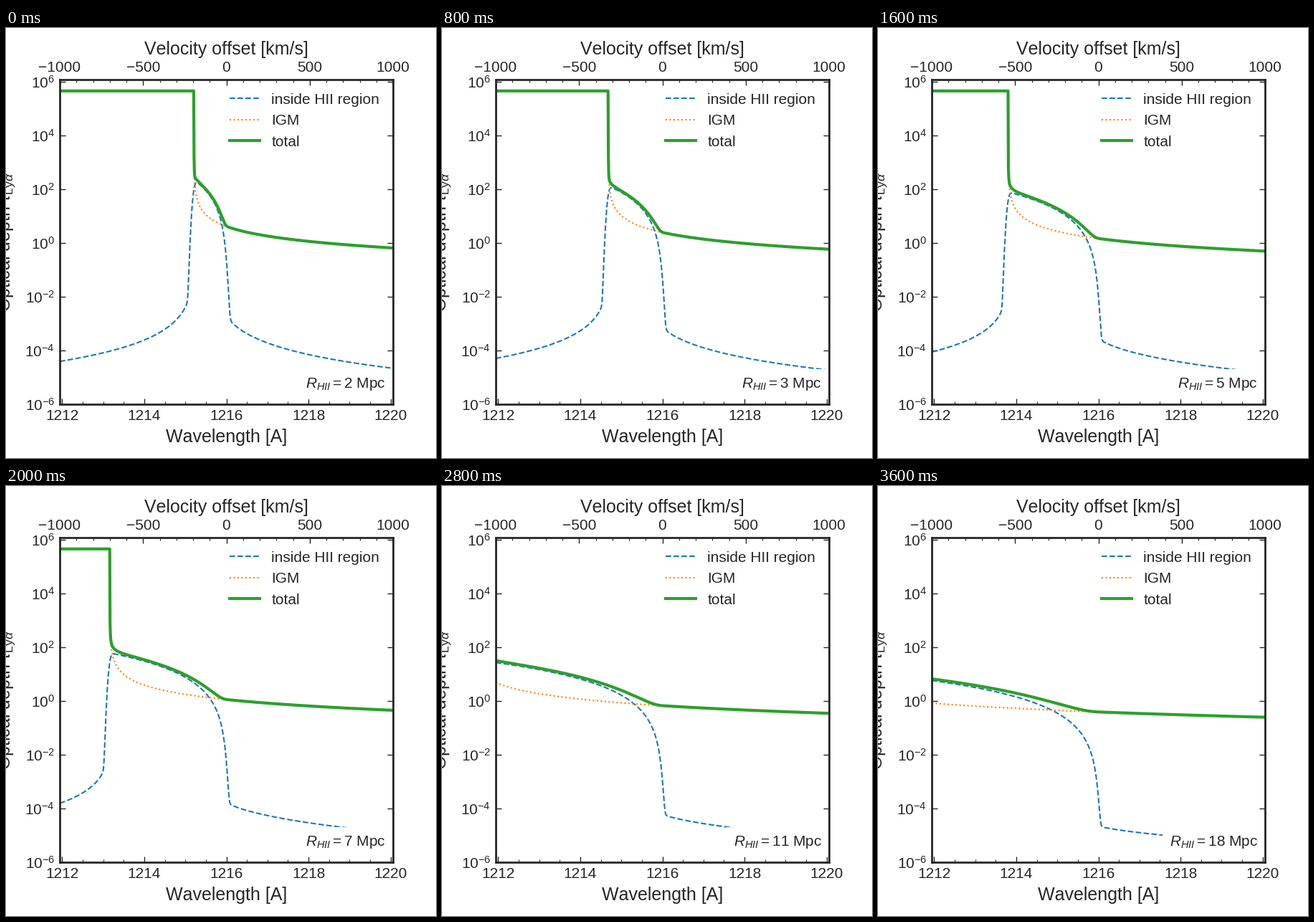
Animation of 600 by 600 pixels, one loop 4 s. Source, as a matplotlib script:

```python
import numpy as np
import matplotlib.pyplot as plt
from matplotlib.animation import FuncAnimation
from matplotlib.ticker import AutoMinorLocator, FixedLocator, MultipleLocator, NullLocator

INK = "#262626"
plt.rcParams.update({
    "font.family": "Liberation Sans",
    "font.size": 15,
    "text.kerning_factor": 6,
    "mathtext.fontset": "custom",
    "mathtext.rm": "Liberation Sans",
    "mathtext.it": "Liberation Sans:italic",
    "mathtext.fallback": "cm",
    "text.color": INK,
    "axes.edgecolor": INK,
    "axes.linewidth": 2,
    "xtick.color": INK,
    "ytick.color": INK,
})

C = 299792.458      # speed of light, km/s
LINE = 1216.0       # line centre, Angstrom
HUBBLE = 107.0      # km/s per Mpc
B = 12.85           # thermal width, km/s
WING = 2.0e-3       # damping wing strength, km/s
TAU_GP = 4.55e5     # depth of the neutral gas
RADII = np.logspace(0, 1, 10) * 20 / 11

v = np.linspace(-1000, 1000, 1001)
wave = LINE * (1 + v / C)


def igm_depth(radius):
    gap = v + HUBBLE * radius
    wing = 0.0027 * C / np.maximum(gap, 1e-3) - 0.026
    return np.where(gap > 0, np.minimum(wing, TAU_GP), TAU_GP)


def bubble_depth(radius, n=1500):
    """Residual neutral gas, growing as r^2, smeared by a Voigt profile."""
    r = (np.arange(n) + 0.5) * radius / n
    depth = 400 * r**2 / radius**3
    d2 = (v[:, None] + HUBBLE * r) ** 2
    core = np.exp(-d2 / B**2) / (np.sqrt(np.pi) * B)
    wing = WING / np.maximum(d2, (1.5 * B) ** 2)
    return (core + wing) @ depth * HUBBLE * radius / n


fig, ax = plt.subplots(figsize=(6, 6), dpi=100, facecolor="white")
fig.subplots_adjust(left=0.125, right=0.9, bottom=0.125, top=0.88)

ax.set_yscale("log")
ax.set_xlim(wave[0], wave[-1])
ax.set_ylim(1e-6, 1.2e6)
ax.xaxis.set_major_locator(MultipleLocator(2))
ax.xaxis.set_minor_locator(AutoMinorLocator(4))
ax.yaxis.set_major_locator(FixedLocator(10.0 ** np.arange(-6, 7, 2)))
ax.yaxis.set_minor_locator(NullLocator())

top = ax.twiny()
top.set_xlim(-1000, 1000)
top.xaxis.set_major_locator(MultipleLocator(500))
top.xaxis.set_minor_locator(AutoMinorLocator(5))
for side in top.spines.values():
    side.set_visible(False)

for a in (ax, top):
    a.tick_params(which="major", direction="in", length=6, width=1, pad=5)
    a.tick_params(which="minor", direction="in", length=3, width=0.8)
ax.tick_params(axis="y", right=True)


def label(x, y, text, **kw):
    fig.text(x / 600, 1 - y / 600, text, fontsize=18, ha="center",
             va="baseline", rotation_mode="anchor", **kw)


label(307.5, 37, "Velocity offset [km/s]")
label(307.5, 578, "Wavelength [A]")
label(6, 298.5, r"Optical depth $\tau_{\mathregular{Ly}\alpha}$", rotation=90)

inside, = ax.plot([], [], "--", color="#1f77b4", lw=1.5, label="inside HII region")
igm, = ax.plot([], [], ":", color="#ff7f0e", lw=1.5, label="IGM")
total, = ax.plot([], [], "-", color="#2ca02c", lw=3, label="total")
ax.legend(loc="upper right", frameon=False)

note = ax.text(0.979, 0.05, "", transform=ax.transAxes, ha="right",
               va="baseline", zorder=2.4,
               bbox=dict(boxstyle="square,pad=0.48", fc="white", ec="none"))


def update(i):
    radius = RADII[i]
    a, b = bubble_depth(radius), igm_depth(radius)
    inside.set_data(wave, a)
    igm.set_data(wave, b)
    total.set_data(wave, a + b)
    note.set_text(rf"$R_{{HII}}=\mathrm{{{radius:.0f}}}$ Mpc")
    return inside, igm, total, note


anim = FuncAnimation(fig, update, frames=len(RADII), interval=400,
                     repeat=True, repeat_delay=0)
plt.show()
```
